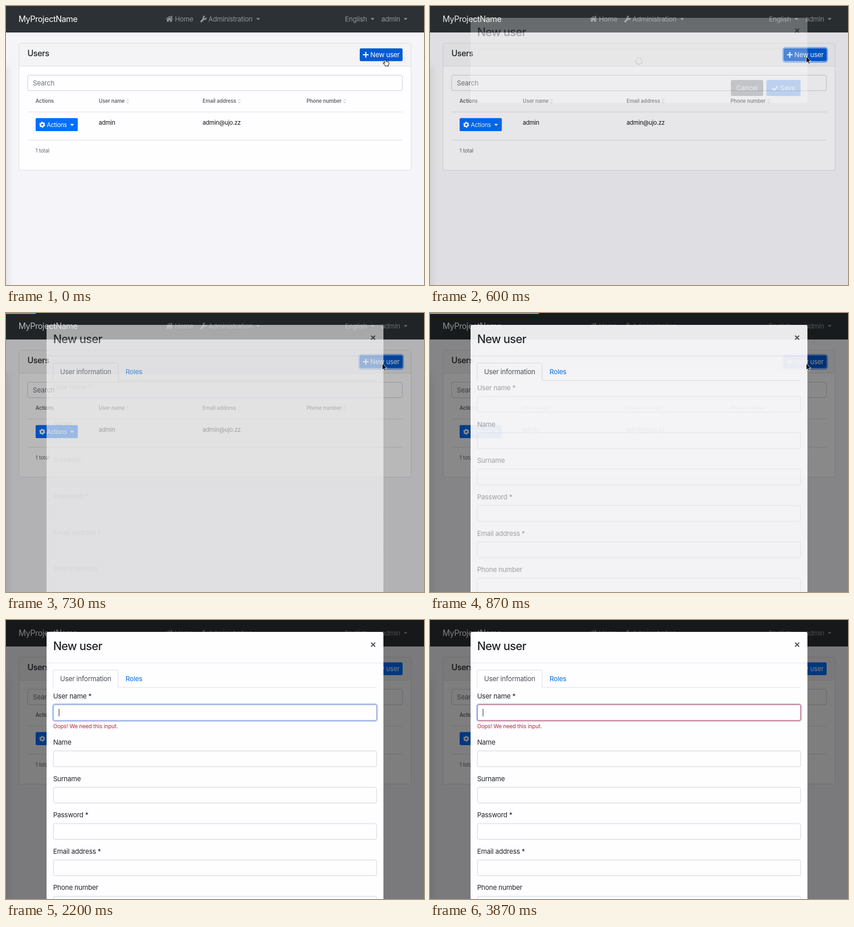
An HTML page that plays this animation: 917x611 px, repeating every 4270 ms.

```html
<!DOCTYPE html>
<html lang="en">
<head>
<meta charset="utf-8">
<title>New user dialog</title>
<style>
html, body { margin: 0; width: 100%; height: 100%; overflow: hidden; background: #f5f5f9; }
svg { display: block; width: 100vw; height: 100vh; }
text { font-family: Inter, "Liberation Sans", sans-serif; font-size: 14.8px; letter-spacing: -.019em; fill: #212529; white-space: pre; }
.brand { font-size: 18px; letter-spacing: -.03em; fill: #fff; }
.head { font-size: 18px; letter-spacing: -.03em; font-weight: 500; }
.title { font-size: 25px; letter-spacing: -.03em; font-weight: 500; }
.nav { fill: #929598; }
.col { font-size: 11.1px; letter-spacing: -.01em; font-weight: 600; fill: #66666a; }
.foot { font-size: 11.1px; letter-spacing: 0; fill: #606064; }
.cell { font-size: 12.9px; letter-spacing: -.015em; fill: #111; }
.btn { font-size: 12.9px; fill: #fff; }
.white { fill: #fff; }
.grey { fill: #6c757d; }
.tab { fill: #495057; }
.link { fill: #0070e8; }
.error { font-size: 11.84px; letter-spacing: -.005em; fill: #c01f30; }
</style>
</head>
<body>
<svg id="stage" viewBox="0 0 917 611" preserveAspectRatio="none"></svg>
<script>
const LOOP = 4270, TICK = 1000 / 15;
const BLUE = '#006fff', HOVER = '#005bd6', PAPER = '#fefdff';

const label = (x, y, s, c = '') => `<text x="${x}" y="${y}" class="${c}">${s}</text>`;
const box = (x, y, w, h, fill, extra = '') =>
  `<rect x="${x}" y="${y}" width="${w}" height="${h}" fill="${fill}" ${extra}/>`;
const rule = (x1, x2, y, c = '#d9dade') => `<path d="M${x1} ${y}H${x2}" stroke="${c}"/>`;
const group = (id, body, extra = '') => `<g id="${id}" ${extra}>${body}</g>`;
const caretDown = (x, y, c) => `<path d="M${x} ${y}h8.6l-4.3 4.4z" fill="${c}"/>`;
const sorter = x => `<path d="M${x} 207l2.6-2.6 2.6 2.6M${x} 209.8l2.6 2.6 2.6-2.6" fill="none" stroke="#a5a5aa"/>`;
const input = (y, id = '') =>
  box(104, y, 709, 34.5, PAPER, `rx="3.5" stroke="#c9ced3" ${id && `id="${id}"`}`);

const homeIcon = `<path transform="translate(350.3 20.6) scale(.0288)" fill="#929598"
  d="M288 146L96 304V480H240V352H336V480H480V304ZM8 260L288 36 408 132V32H488V196L568 260 536 300 288 96 40 300Z"/>`;
const wrenchIcon = `<g fill="none" stroke="#929598"><path d="M428.3 33.8L434 28" stroke-width="4" stroke-linecap="round"/>
  <path d="M436.4 22.9A3.1 3.1 0 1 0 438.9 25.6" stroke-width="3"/></g>`;
const gearIcon = `<g fill="none" stroke="#fff"><circle cx="79.4" cy="260" r="3.7" stroke-width="3"/>
  <circle cx="79.4" cy="260" r="5.4" stroke-width="2.2" stroke-dasharray="3.2 2.455"/></g>`;

function page() {
  const nav = box(0, 0, 917, 58, '#2c3135') + label(27.5, 35, 'MyProjectName', 'brand')
    + homeIcon + label(370.5, 34.3, 'Home', 'nav')
    + wrenchIcon + label(444, 34.3, 'Administration', 'nav') + caretDown(548.8, 26.4, '#929598')
    + label(743.5, 34.3, 'English', 'nav') + caretDown(799.8, 26.4, '#929598')
    + label(823.5, 34.3, 'admin', 'nav') + caretDown(872.3, 26.4, '#929598');
  const card = box(28.5, 81.5, 860, 278, PAPER, 'rx="3.5" stroke="#d9d9dd"')
    + box(29, 82, 859, 49.5, '#f4f3f5', 'rx="3"') + rule(29, 888, 131.8)
    + label(47, 110, 'Users', 'head')
    + box(774.5, 91.3, 97, 31.4, 'none', 'id="ring" rx="5" stroke="#7fb2ff" stroke-width="3"')
    + box(776, 92.8, 94, 28, HOVER, 'id="add" rx="3"')
    + '<path d="M783 106.8h12.6M789.3 100.5v12.6" stroke="#fff" stroke-width="2.6"/>'
    + label(799.3, 112, 'New user', 'white')
    + box(47.5, 151.5, 822, 34, PAPER, 'rx="3.5" stroke="#c4c8cd"') + label(58.8, 174.3, 'Search', 'grey');
  const table = label(64.8, 212.2, 'Actions', 'col')
    + label(203.6, 212.2, 'User name', 'col') + sorter(264.2)
    + label(431.3, 212.2, 'Email address', 'col') + sorter(509)
    + label(659.3, 212.2, 'Phone number', 'col') + sorter(740)
    + rule(47, 870, 232) + rule(47, 870, 293.8)
    + box(65, 245.5, 92.5, 28.4, BLUE, 'rx="2.5"') + gearIcon
    + label(89.6, 264.9, 'Actions', 'btn') + caretDown(140.7, 258.3, '#fff')
    + label(203.4, 260.3, 'admin', 'cell') + label(431.3, 260.3, 'admin@ujo.zz', 'cell')
    + label(64.8, 321.3, '1 total', 'foot');
  return box(0, 0, 917, 611, '#f5f5f9')
    + box(-40, 130, 40, 560, '#000', 'opacity=".12" filter="url(#soft)"') + nav + card + table;
}

function loadingPanel() {
  let dots = '';
  for (let i = 0; i < 8; i++) {
    const a = i * Math.PI / 4;
    dots += `<circle cx="${7 * Math.cos(a)}" cy="${7 * Math.sin(a)}" r="1.4" opacity="${.4 + i * .08}"/>`;
  }
  return box(89, 26, 739, 186, PAPER, 'rx="3.7"') + rule(89, 828, 94, '#e3e3e7') + rule(89, 828, 147, '#e3e3e7')
    + group('spin', dots, 'fill="#555"')
    + box(660, 162, 71, 35, '#6c757d', 'rx="3.5"') + label(672, 185, 'Cancel', 'white')
    + `<g opacity=".65">${box(738, 162, 75, 35, BLUE, 'rx="3.5"')}</g>`
    + '<path d="M751 180l4 4.2 8-8.6" fill="none" stroke="#fff" stroke-width="2.8"/>'
    + label(768, 185, 'Save', 'white');
}

function formPanel() {
  const names = ['Name', 'Surname', 'Password *', 'Email address *', 'Phone number'];
  const rest = names.map((s, i) =>
    label(103.4, 251.7 + 79.6 * i, s) + input(265.3 + 79.6 * i)).join('');
  return box(89, 26, 739, 600, PAPER, 'rx="3.7"') + rule(89, 828, 94, '#dfe2e6')
    + '<path d="M103.5 148V113a3.5 3.5 0 0 1 3.5-3.5H242.5a3.5 3.5 0 0 1 3.5 3.5V147.7H813.5" fill="none" stroke="#dadde2"/>'
    + label(118.8, 134.3, 'User information', 'tab') + label(262.3, 134.3, 'Roles', 'link')
    + group('fields', label(103.4, 172.2, 'User name *')
      + box(102.6, 183.8, 711.9, 37.6, 'none', 'id="glow" rx="5" stroke="#b9d6ff" stroke-width="3"')
      + input(185.5, 'first')
      + box(115.8, 194.5, 1.1, 16.5, '#222', 'id="caret"')
      + group('error', label(103.4, 237.2, 'Oops! We need this input.', 'error'))
      + group('rest', rest));
}

const pointer = `<g id="pointer">
  <path id="arrow" d="M0 0V14.2L3.3 11.2 5.5 16.4 7.9 15.4 5.7 10.3H10.2Z" fill="#000" stroke="#fff"/>
  <path id="hand" d="M-1.6 1.2Q-.3-.8 1 .9L2.2 4.6Q3.2 3.8 4.1 5Q5.2 4.3 6 5.5Q7.7 5 8.3 6.8Q9.3 10 7.6 12.2V14.4H.7Q-.6 11.6-4 8.7Q-4.8 6.7-2.8 6.9L-.3 8.2Z"
    fill="#fff" stroke="#111" stroke-width="1.1"/></g>`;

document.getElementById('stage').innerHTML =
  '<defs><filter id="soft" x="-100%" width="300%"><feGaussianBlur stdDeviation="10"/></filter></defs>'
  + page()
  + box(0, 0, 917, 611, '#000', 'id="shade"')
  + group('modal', group('loading', loadingPanel()) + group('form', formPanel())
    + label(103.4, 66, 'New user', 'title')
    + '<path d="M801 49.6l8.8 8.8M809.8 49.6l-8.8 8.8" stroke="#58585b" stroke-width="2.5"/>')
  + box(0, 0, 0, 2, '#69acff', 'id="bar"')
  + pointer;

const el = id => document.getElementById(id);
const set = (id, name, value) => el(id).setAttribute(name, value);
const show = (id, on) => set(id, 'opacity', +on);
const ramp = (t, from, span) => Math.min(1, Math.max(0, (t - from) / span));
const mix = (a, b, p) => `rgb(${a.map((v, i) => Math.round(v + (b[i] - v) * p))})`;

const caretOn = t => [[1330, 1590], [1860, 2390], [2860, 3390], [3860, LOOP]]
  .some(([a, b]) => t >= a && t < b);

function barWidth(t) {
  return t < 725 ? 0 : Math.min(917, 65 + (t - 733) * 1.3 + Math.max(0, t - 930) * 3);
}

function draw(ms) {
  // the screen refreshes 15 times a second
  const t = Math.floor((ms % LOOP + 5) / TICK) * TICK;
  const loaded = t > 725, invalid = t > 2190;

  show('ring', ramp(t, 265, 130) * (1 - ramp(t, 1000, 150)));
  set('add', 'fill', t < 1000 ? HOVER : BLUE);
  show('shade', .5 * ramp(t, 535, 362));
  show('modal', ramp(t, 470, 433));
  show('loading', !loaded);
  show('form', loaded);
  set('spin', 'transform', `translate(458 120.5) rotate(${t * .36})`);

  const p = ramp(t, 700, 400);
  show('fields', p);
  set('fields', 'transform', `translate(0 ${-5 * (1 - p)})`);
  const focus = ramp(t, 1060, 150), red = ramp(t, 2180, 180);
  show('glow', focus);
  set('first', 'stroke', invalid
    ? mix([112, 140, 205], [190, 35, 55], red)
    : mix([201, 206, 211], [128, 180, 255], focus));
  show('caret', caretOn(t));
  show('error', invalid);
  set('rest', 'transform', `translate(0 ${invalid ? 21.4 : 0})`);

  set('bar', 'width', barWidth(t));
  show('bar', 1 - ramp(t, 1130, 215));

  const move = 1 - ramp(t, 200, 133);
  set('pointer', 'transform', `translate(${825.5 + 6 * move} ${110.5 + 6.5 * move})`);
  show('pointer', t < 1860);
  show('hand', t < 530);
  show('arrow', t >= 530);
}

function frame() {
  draw(performance.now());
  requestAnimationFrame(frame);
}
frame();
</script>
</body>
</html>
```
